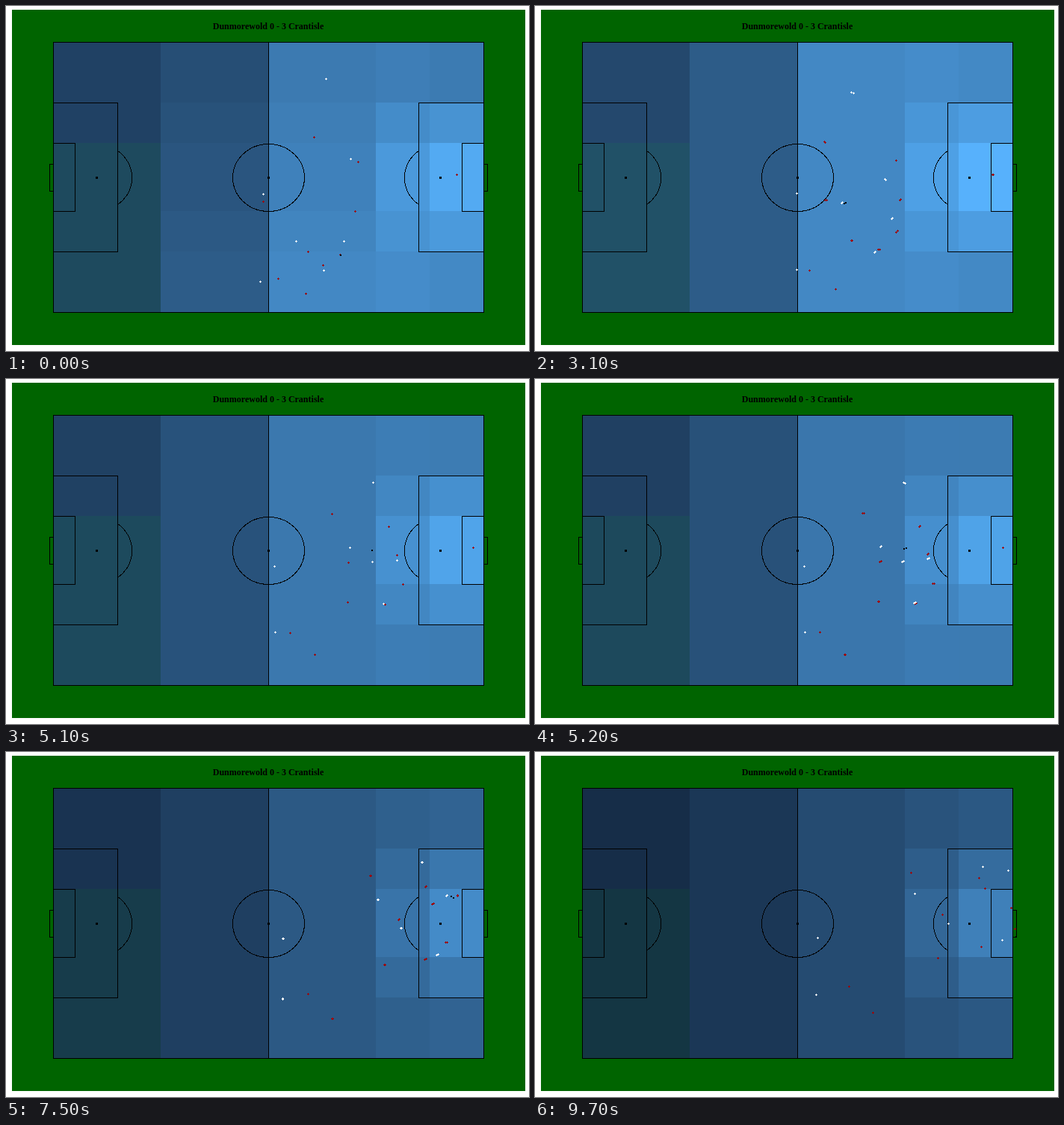
Write an HTML page that moves like this. It is 700 by 461 pixels and loops after 10 s.

```html
<!DOCTYPE html>
<html lang="en">
<head>
<meta charset="utf-8">
<title>Pitch map</title>
<style>
  html, body { margin: 0; width: 100%; height: 100%; overflow: hidden; background: #fff; }
  svg { display: block; shape-rendering: crispEdges; }
  .lines { fill: none; stroke: #000; }
  text { font: bold 12px "Liberation Serif", "Times New Roman", serif; text-anchor: middle; }
</style>
</head>
<body>
<svg width="700" height="461" viewBox="0 0 700 461">
  <rect x="8" y="5" width="687" height="448" fill="#006400"/>
  <text x="351" y="31">Dunmorewold 0 - 3 Crantisle</text>
  <g id="cells"></g>
  <g class="lines">
    <path d="M63.5 48.5h576v361h-576zM351.5 48.5v361"/>
    <path d="M63.5 129.5h86v199h-86M63.5 183.5h29v91h-29M63.5 211.5h-5v36h5"/>
    <path d="M639.5 129.5h-87v199h87M639.5 183.5h-29v91h29M639.5 211.5h5v36h-5"/>
    <ellipse cx="351.5" cy="229.5" rx="48" ry="45"/>
    <path d="M149.5 193.5A48 45 0 0 1 149.5 265.5M552.5 193.5A48 45 0 0 0 552.5 265.5"/>
  </g>
  <circle cx="121.5" cy="229.5" r="1.7"/>
  <circle cx="351.5" cy="229.5" r="1.5"/>
  <circle cx="581.5" cy="229.5" r="1.7"/>
  <path id="away" fill="#a00000"/>
  <path id="home" fill="#fff"/>
  <path id="ball" fill="#000"/>
</svg>
<script>
const $ = id => document.getElementById(id);
const LOOP = 10000, STEP = 100, LAST = 97, TURN = 20, SPRINT = 41;

// Samples come slightly faster than steps, so some steps show two of them.
const FIRST = 0.25, GAP = 13 / 18;

const easeIn = u => u ** 1.7;
const easeOut = (u, power = 1.25) => 1 - (1 - u) ** power;

// A run is a few points: start, optional turn, sprint, end.
const teams = { away: [], home: [], ball: [] };
function run(team, points, { brake, keys } = {}) {
  keys ??= points.length > 3 ? [0, TURN, SPRINT, LAST] : [0, SPRINT, LAST];
  teams[team].push({ points, brake, keys });
}

run('away', [[603, 225], [626, 225], [603, 191], [637, 208]], { keys: [0, 52, 75, LAST] });
run('away', [[412, 175], [379, 178], [405, 189], [503, 161]], { brake: 2 });
run('away', [[471, 208], [490, 205], [594, 168]]);
run('away', [[467, 274], [502, 249], [602, 182]]);
run('away', [[344, 261], [417, 258], [545, 217]], { brake: 2 });
run('away', [[447, 332], [507, 282], [642, 236]], { brake: 1 });
run('away', [[424, 346], [482, 312], [597, 260]]);
run('away', [[404, 328], [435, 304], [539, 275]]);
run('away', [[364, 364], [369, 346], [420, 313]]);
run('away', [[401, 384], [403, 374], [452, 348]]);

run('home', [[428, 97], [406, 106], [462, 134], [599, 153]]);
run('home', [[461, 204], [473, 248], [553, 229]]);
run('home', [[344, 251], [354, 250], [378, 248]]);
run('home', [[388, 314], [397, 272], [438, 242], [508, 189]], { brake: 2 });
run('home', [[452, 314], [493, 265], [633, 158]]);
run('home', [[425, 353], [472, 313], [625, 251]]);
run('home', [[340, 368], [356, 342], [376, 324]]);

run('ball', [[447, 332], [398, 270], [565, 193], [597, 192], [643, 246]],
    { brake: 2, keys: [0, TURN, 64, 75, LAST] });

// Every leg speeds up except the last, which slows down.
function place({ points, brake, keys }, t) {
  const end = keys.length - 2;
  let i = 0;
  while (i < end && t >= keys[i + 1]) i++;
  const u = (t - keys[i]) / (keys[i + 1] - keys[i]);
  const p = i === end ? easeOut(u, brake) : easeIn(u);
  return points[i].map((a, n) => Math.round(a + (points[i + 1][n] - a) * p));
}

// Each column has a peak level and an amount it loses after the sprint.
const rows = [49, 129, 183, 274, 328, 409];
const columns = [
  { x: 64, w: 143, peak: 72, loss: 27 },
  { x: 207, w: 144, peak: 92, loss: 37 },
  { x: 351, w: 144, peak: 136, loss: 61 },
  { x: 495, w: 72, peak: 148, loss: 57, goal: 0.5 },
  { x: 567, w: 72, peak: 153, loss: 49, goal: 1 }
];

const cells = columns.flatMap((col, c) => rows.slice(0, -1).map((y, r) => {
  const el = document.createElementNS('http://www.w3.org/2000/svg', 'rect');
  const box = { x: col.x, y, width: col.w, height: rows[r + 1] - y };
  for (const name in box) el.setAttribute(name, box[name]);
  $('cells').append(el);
  return { el, c, r, ...col };
}));

function shade({ c, r, peak, loss, goal = 0 }, k) {
  const teal = c === 0 && r > 1;
  const early = Math.max(0, 1 - k / TURN);
  const fade = easeOut(Math.max(0, (k - SPRINT) / (LAST - SPRINT)), 1.6);
  let g = peak - loss * fade - 7 * early;
  g += goal * (24 - 20 * Math.abs(r - 2));
  if (teal) g += 9;
  if (c) g += 3.5 * early * (r - 2);
  const red = 22 + 0.485 * (g - 44) - (teal ? 7 : 0);
  const blue = 71 + 1.36 * (g - 44) - (teal ? 18 : 0);
  return `rgb(${[red, g, blue].map(Math.round)})`;
}

const plus = ([x, y]) => `M${x - 1} ${y}h3v1h-3zM${x} ${y - 1}h1v3h-1z`;
const speck = ([x, y]) => `M${x} ${y}h2v2h-2z`;

function samples(k) {
  const times = [];
  const first = Math.max(0, Math.ceil((k - 0.5 - FIRST) / GAP));
  for (let t = FIRST + first * GAP; t < k + 0.5; t += GAP) {
    times.push(k === 0 ? 0 : Math.min(LAST, t));
  }
  return times;
}

function draw(k) {
  for (const cell of cells) cell.el.setAttribute('fill', shade(cell, k));
  const times = samples(k);
  for (const team in teams) {
    const dot = team === 'ball' ? speck : plus;
    const dots = teams[team].flatMap(path => times.map(t => dot(place(path, t))));
    $(team).setAttribute('d', dots.join(''));
  }
}

let shown = -1;
function tick() {
  const k = Math.min(LAST, Math.floor(performance.now() % LOOP / STEP));
  if (k !== shown) draw(shown = k);
  requestAnimationFrame(tick);
}
tick();
</script>
</body>
</html>
```
